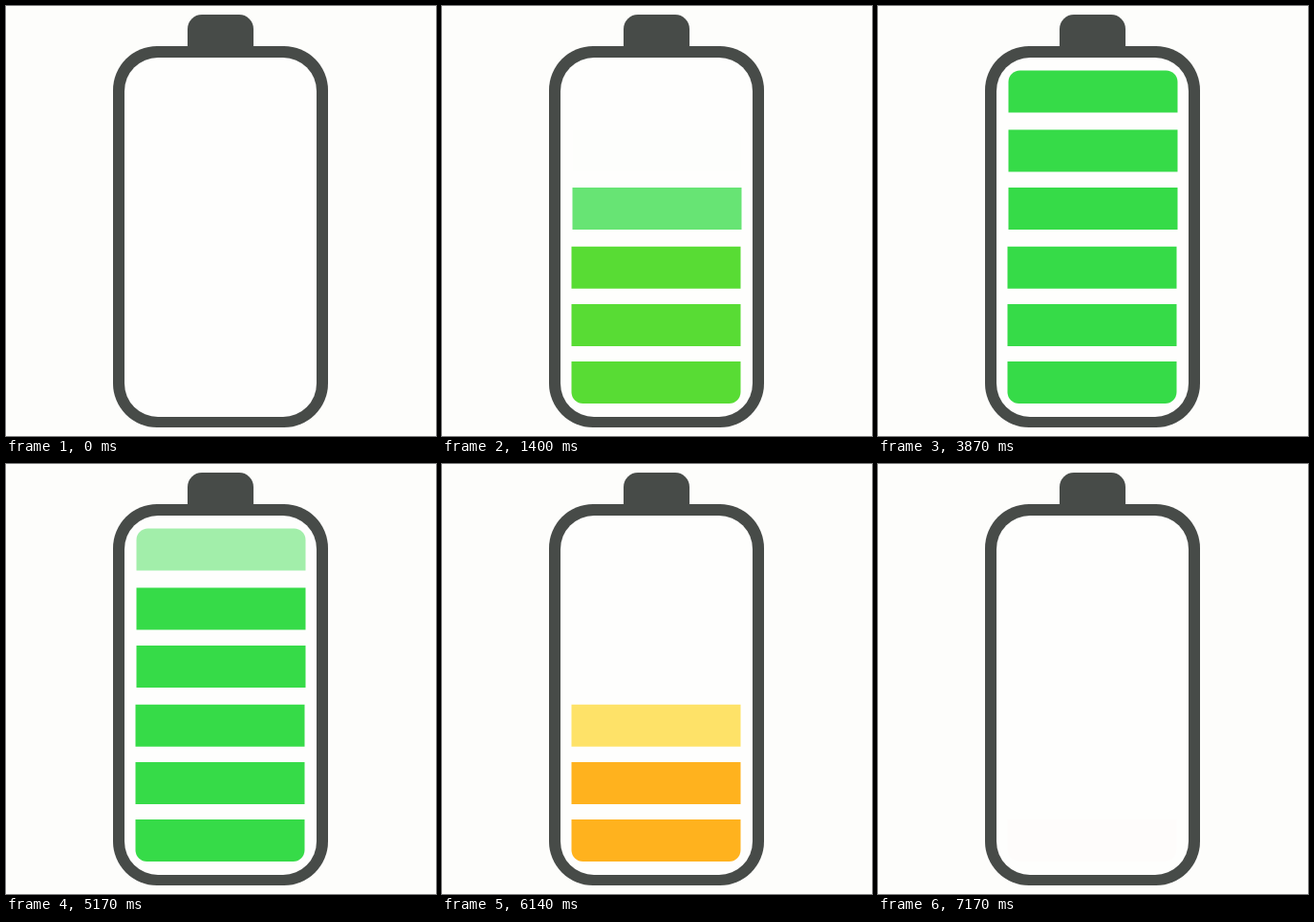
Write an HTML page that moves like this. It is 450x450 px and loops after 7.2 s.

```html
<!DOCTYPE html>
<html lang="en">
<head>
<meta charset="utf-8">
<title>Battery</title>
<style>
html, body { margin: 0; width: 100%; height: 100%; overflow: hidden; background: #fdfdfb; }
svg { display: block; width: 100vw; height: 100vh; }
</style>
</head>
<body>
<svg viewBox="0 0 450 450">
  <g fill="#474b48">
    <path d="M190 54V24a15 15 0 0 1 15-15h39a15 15 0 0 1 15 15v30z"/>
    <rect x="112" y="42" width="225" height="399" rx="46"/>
  </g>
  <rect x="124" y="54" width="201" height="376" rx="35" fill="#fefefd"/>
  <g id="bars"></g>
</svg>
<script>
const LOOP = 7200;
const FILL = { start: 160, step: 310, fade: 413 };
const DRAIN = { start: 4900, step: 355, fade: 500 };

// Bars from bottom to top; each takes its colour between its two times
const bars = [
  { x: 135.5, y: 372, from: 345, to: 6820, d: 'h177v32a12 12 0 0 1-12 12h-153a12 12 0 0 1-12-12z' },
  { x: 135.5, y: 312, from: 800, to: 6500 },
  { x: 135.5, y: 251.7, from: 1110, to: 6010 },
  { x: 136.5, y: 190, from: 1535, to: 5610 },
  { x: 136.5, y: 129.5, from: 1535, to: 5610 },
  { x: 136.5, y: 67.5, from: 1535, to: 5610, d: 'm0 12a12 12 0 0 1 12-12h153a12 12 0 0 1 12 12v32h-177z' }
];

const red = [255, 66, 50], orange = [255, 84, 46], yellow = [255, 212, 24];
const lime = [88, 220, 52], green = [54, 219, 72];
const tints = [
  [345, red], [800, orange], [1110, yellow], [1400, lime], [1535, green],
  [5610, green], [6010, yellow], [6500, orange], [6820, red]
];

const clamp = (v, lo, hi) => Math.min(hi, Math.max(lo, v));
const progress = (t, phase, i) => (t - phase.start - i * phase.step) / phase.fade;

function tint(t) {
  const i = clamp(tints.findIndex(([at]) => at >= t), 1, tints.length - 1);
  const [t0, a] = tints[i - 1], [t1, b] = tints[i];
  const p = clamp((t - t0) / (t1 - t0), 0, 1);
  return `rgb(${a.map((v, k) => Math.round(v + (b[k] - v) * p))})`;
}

for (const bar of bars) {
  bar.el = document.createElementNS('http://www.w3.org/2000/svg', 'path');
  bar.el.setAttribute('d', `M${bar.x} ${bar.y}${bar.d || 'h177v44h-177z'}`);
  document.getElementById('bars').append(bar.el);
}

function draw(t) {
  bars.forEach((bar, i) => {
    const shown = progress(t, FILL, i);
    const gone = progress(t, DRAIN, bars.length - 1 - i);
    bar.el.setAttribute('opacity', clamp(Math.min(shown, 1 - gone), 0, 1));
    bar.el.setAttribute('fill', tint(clamp(t, bar.from, bar.to)));
  });
}

const begin = performance.now();
function tick() {
  draw((performance.now() - begin) % LOOP);
  requestAnimationFrame(tick);
}
tick();
</script>
</body>
</html>
```
